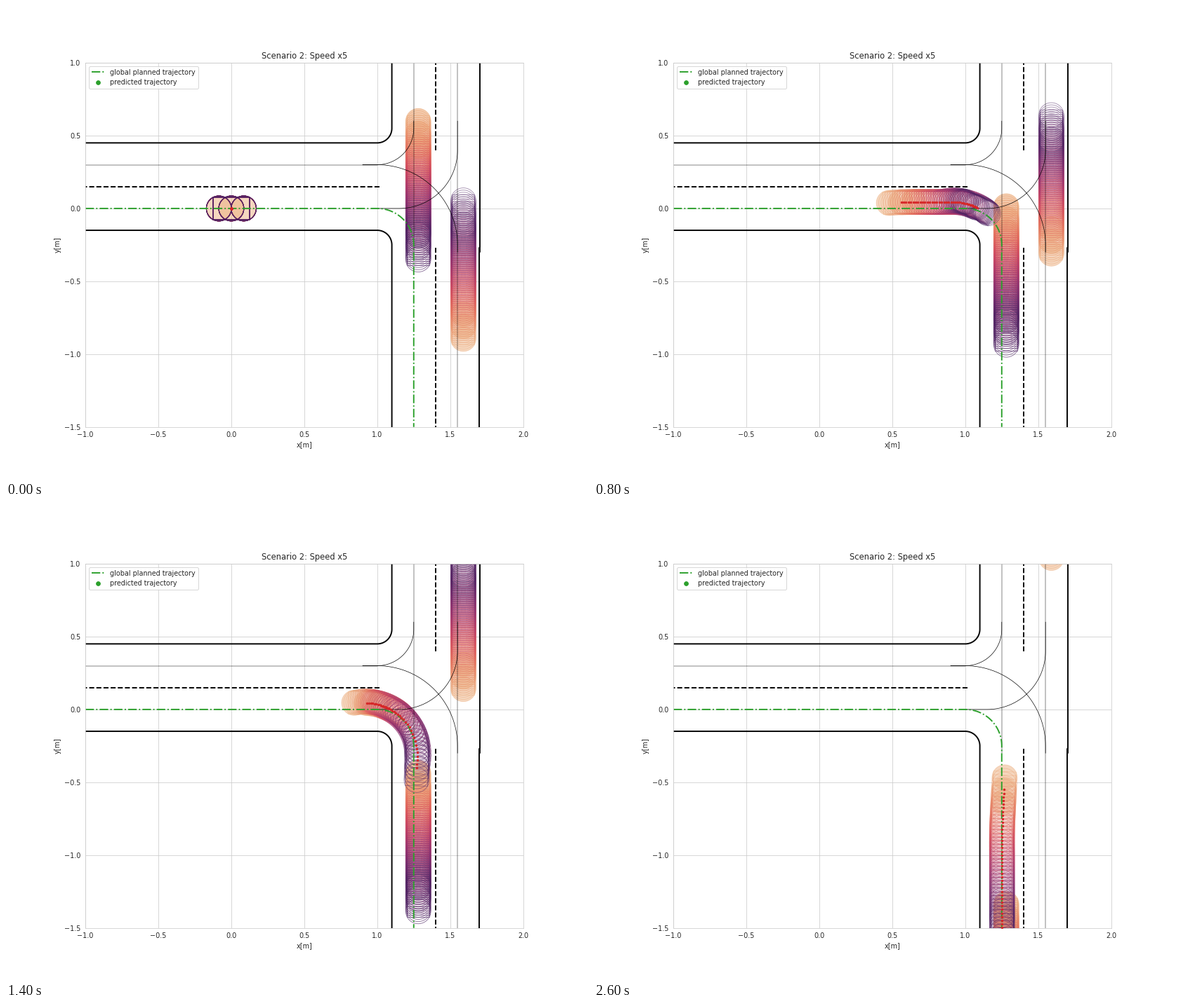
A matplotlib script that plays this animation: 829 px wide and 675 px high, repeating every 2.7 s.

```python
import numpy as np
import matplotlib.pyplot as plt
from matplotlib.animation import FuncAnimation
from matplotlib.collections import PolyCollection
from matplotlib.colors import LinearSegmentedColormap

W, H, DPI = 829, 675, 69
FRAMES, INTERVAL = 27, 100
SPEEDUP, HORIZON = 5, 5.2    # playback factor, prediction length in s
OBSTACLE_SPEED = 0.15
RADIUS, OFFSET = 0.086, 0.085
HALF_L, HALF_W = 0.125, 0.077

plt.rcParams.update({
    "font.family": "DejaVu Sans", "font.size": 10,
    "text.color": ".15", "axes.labelcolor": ".15",
    "xtick.color": ".15", "ytick.color": ".15",
    "axes.edgecolor": ".8", "grid.color": ".8", "axes.axisbelow": True,
    "lines.solid_capstyle": "round",
})

flare = LinearSegmentedColormap.from_list("flare", [
    "#edb081", "#e98d6b", "#e3685c", "#d14a61",
    "#b13c6c", "#8f3371", "#6c2b6d", "#4b2362"])


def smoothstep(u):
    u = np.clip(u, 0, 1)
    return u * u * (3 - 2 * u)


# The ego vehicle cruises, brakes before the turn, then speeds up
clock = np.linspace(0, 20, 2001)
speed = np.interp(clock, [0, 3, 6.8, 8.8, 11, 13],
                  [0.17, 0.122, 0.122, 0.04, 0.2, 0.187])
covered = np.cumsum(speed) * clock[1]

# Its path: a slight swerve to the left, a quarter turn, a drift to the lane
TURN_X, TURN_R, SWERVE, DRIFT = 0.92, 0.353, 0.044, 0.021
TURN_LEN = TURN_R * np.pi / 2


def path_at(s):
    a = np.clip((s - TURN_X) / TURN_R, 0, np.pi / 2)
    after = np.maximum(s - TURN_X - TURN_LEN, 0)
    x = np.minimum(s, TURN_X) + TURN_R * np.sin(a) - DRIFT * smoothstep(after / 0.6)
    y = SWERVE * smoothstep(s / 0.65) - TURN_R * (1 - np.cos(a)) - after
    return np.column_stack([x, y])


def ego_poses(t, steps):
    ahead = t + np.linspace(0, HORIZON, steps)
    s = np.interp(ahead, clock, covered) if t else np.zeros(steps)
    dx, dy = (path_at(s + 0.01) - path_at(s - 0.01)).T
    return path_at(s), np.arctan2(dy, dx)


def obstacle_poses(t, steps, x, y, direction):
    ahead = max(t, 0.1) + np.linspace(0, HORIZON, steps)
    pos = np.column_stack([np.full(steps, x),
                           y + direction * OBSTACLE_SPEED * ahead])
    return pos, np.full(steps, direction * np.pi / 2)


phi = np.linspace(0, 2 * np.pi, 48, endpoint=False)
disc = RADIUS * np.column_stack([np.cos(phi), np.sin(phi)])
box = np.array([(-1, -1), (1, -1), (1, 1), (-1, 1)]) * (HALF_L, HALF_W)
SHAPES = [disc + (d, 0) for d in (-OFFSET, 0, OFFSET)] + [box]


def outlines(pos, heading):
    verts = []
    for p, a in zip(pos, heading):
        c, s = np.cos(a), np.sin(a)
        rot = np.array([(c, s), (-s, c)])
        verts += [shape @ rot + p for shape in SHAPES]
    return verts


fig, ax = plt.subplots(figsize=(W / DPI + 1e-6, H / DPI + 1e-6), dpi=DPI)
ax.set(xlim=(-1, 2), ylim=(-1.5, 1), xlabel="x[m]", ylabel="y[m]")
ax.set_aspect("equal")
ax.set_title("Scenario 2: Speed x5")
ax.set_xticks(np.arange(-1, 2.1, 0.5))
ax.set_yticks(np.arange(-1.5, 1.1, 0.5))
ax.tick_params(length=0, pad=7)
ax.grid(True)


def arc(cx, cy, r, start, end):
    a = np.radians(np.linspace(start, end, 40))
    return list(zip(cx + r * np.cos(a), cy + r * np.sin(a)))


def draw(points, lw=2, color="black", **kw):
    ax.plot(*np.array(points).T, lw=lw, color=color, **kw)


# Road borders and lane markings; the northern ones sit slightly to the right
SHIFT = 0.0025
draw([(-1, 0.45)] + arc(1, 0.55, 0.1, -90, 0) + [(1.1, 1)])
draw([(-1, -0.15)] + arc(1, -0.25, 0.1, 90, 0) + [(1.1, -1.5)])
draw([(1.7 + SHIFT, 1), (1.7 + SHIFT, -0.3)])
draw([(1.7, -0.27), (1.7, -1.5)])
draw([(1.015, 0.15), (-1, 0.15)], ls="--")
draw([(1.4 + SHIFT, 0.4), (1.4 + SHIFT, 1)], ls="--")
draw([(1.4, -0.27), (1.4, -1.5)], ls="--")

# Lane centre lines
for line in ([(-1, 0.3), (1, 0.3)], [(1.25, 1), (1.25, -0.3)],
             [(1.55, 1), (1.55, -1.5)]):
    draw(line, lw=0.5)
right_turn = [(1, 0)] + arc(1, -0.25, 0.25, 90, 0)
for line in ([(0.9, 0.3)] + arc(1, 0.55, 0.25, -90, 0) + [(1.25, 0.6)],
             [(0.9, 0.3)] + arc(1, -0.25, 0.55, 90, 0) + [(1.55, -0.3)],
             [(1, 0)] + arc(1.15, 0.4, 0.4, -90, 0) + [(1.55, 0.6)]):
    draw(line, lw=0.7)

draw([(-1, 0)] + right_turn + [(1.25, -1.5)], color="tab:green", ls="-.",
     label="global planned trajectory")
ax.scatter([], [], color="tab:green", label="predicted trajectory")
ax.legend(loc="upper left", scatteryoffsets=[0.5])


def vehicle(steps, alpha):
    """Current pose filled, predicted poses as outlines."""
    edges = np.repeat(flare(np.linspace(0, 1, steps)), len(SHAPES), axis=0)
    edges[:, 3] = alpha
    faces = edges.copy()
    faces[3:, 3] = 0
    return ax.add_collection(PolyCollection(
        [box], facecolors=faces, edgecolors=edges, linewidths=0.9, zorder=1),
        autolim=False)


OBSTACLE_STEPS, EGO_STEPS = 53, 40
down = vehicle(OBSTACLE_STEPS, 0.65)
up = vehicle(OBSTACLE_STEPS, 0.5)
ego = vehicle(EGO_STEPS, 0.5)
dots = ax.scatter([], [], s=13, color="tab:red", linewidths=0, zorder=3)


def update(k):
    t = k * SPEEDUP * INTERVAL / 1000
    down.set_verts(outlines(*obstacle_poses(t, OBSTACLE_STEPS, 1.281, 0.53, -1)))
    up.set_verts(outlines(*obstacle_poses(t, OBSTACLE_STEPS, 1.59, -0.825, 1)))
    pos, heading = ego_poses(t, EGO_STEPS)
    ego.set_verts(outlines(pos, heading))
    dots.set_offsets(pos)
    return down, up, ego, dots


anim = FuncAnimation(fig, update, frames=FRAMES, interval=INTERVAL,
                     init_func=lambda: update(0), repeat=True, repeat_delay=0)
plt.show()
```
